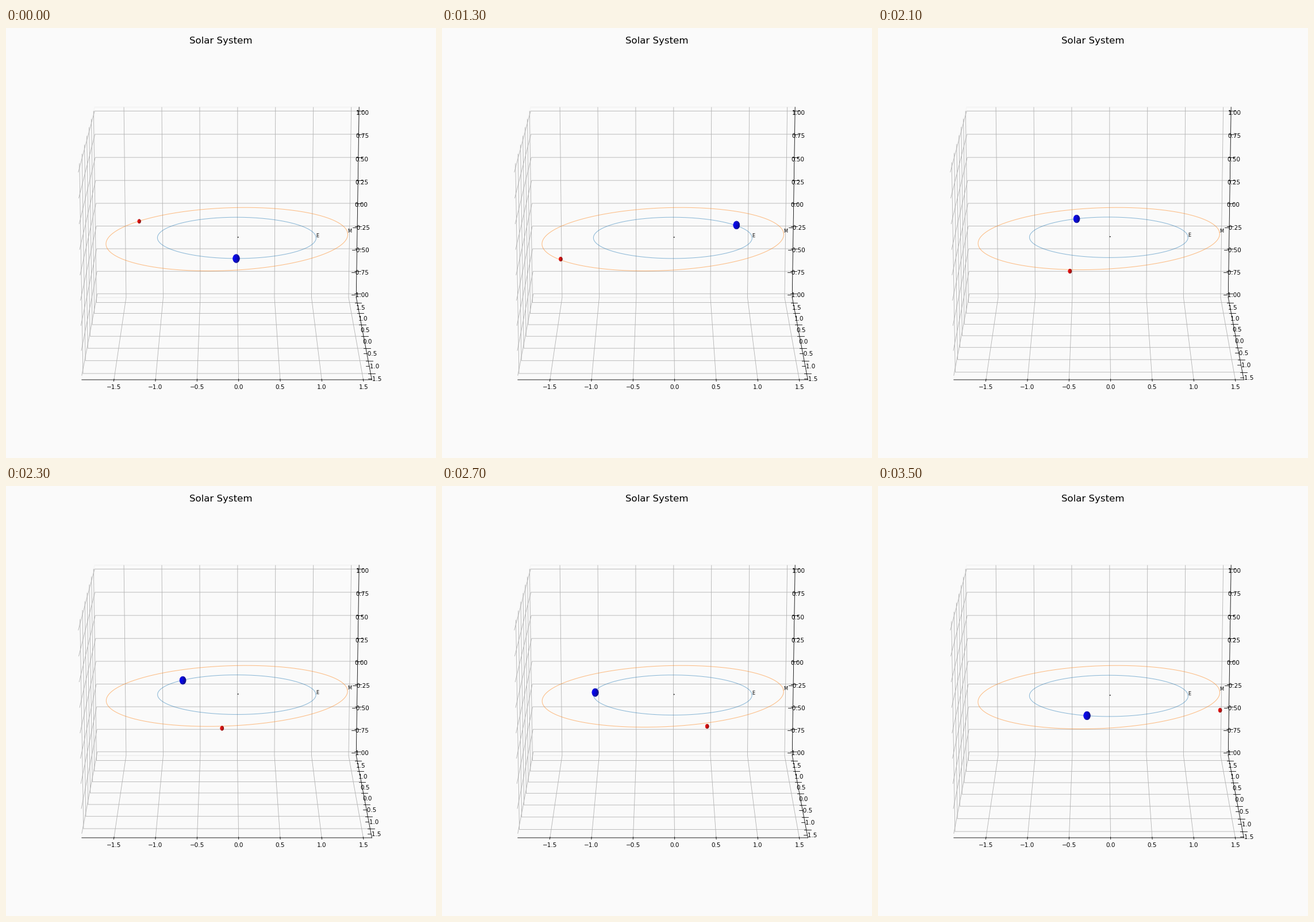
Write a matplotlib script that moves like this. It is 748x748 px and loops after 3.6 s.

```python
import numpy as np
import matplotlib.pyplot as plt
from matplotlib.animation import FuncAnimation

FRAMES, INTERVAL = 36, 100
DAYS_PER_FRAME = 10
KM = 1000 / 149.6e6          # planet radii are enlarged 1000 times
BACK = "#fafafa"


class Planet:
    def __init__(self, label, color, a, e, incl, period, start, radius):
        self.label, self.color = label, color
        self.a, self.e, self.incl = a, e, np.radians(incl)
        self.start = np.radians(start)
        self.step = 2 * np.pi * DAYS_PER_FRAME / period
        self.size = radius * KM
        self.dist = self.radius_at(self.start)

    def radius_at(self, angle):
        return self.a * (1 - self.e ** 2) / (1 + self.e * np.cos(angle))

    def place(self, r, angle):
        x, y = r * np.cos(angle), r * np.sin(angle)
        return x * np.cos(self.incl), y, x * np.sin(self.incl)

    def orbit(self, n=361):
        angle = np.linspace(0, 2 * np.pi, n)
        return self.place(self.radius_at(angle), angle)

    def position(self, i):
        return self.place(self.dist, self.start + (i + 1) * self.step)


earth = Planet("E", "b", 1.0, 0.0167, 0, 365.256, 258.58, 6371)
mars = Planet("M", "r", 1.5237, 0.0934, 1.85, 686.98, 137.16, 3390)
planets = [earth, mars]

u = np.linspace(0, 2 * np.pi, 25)
v = np.linspace(0.03, np.pi - 0.03, 15)
BALL = (np.outer(np.cos(u), np.sin(v)),
        np.outer(np.sin(u), np.sin(v)),
        np.outer(np.ones_like(u), np.cos(v)))


def draw_ball(center, radius, color):
    x, y, z = (c + radius * b for c, b in zip(center, BALL))
    return ax.plot_surface(x, y, z, color=color, rstride=1, cstride=1)


def padded(lo, hi):
    """Data range plus a 5 % margin and a 1/48 view margin."""
    for m in (0.05, 1 / 48):
        pad = m * (hi - lo)
        lo, hi = lo - pad, hi + pad
    return lo, hi


fig = plt.figure(figsize=(10, 10), dpi=74.8, facecolor=BACK)
fig.suptitle("Solar System", fontsize=16)
ax = fig.add_axes([0, 0, 1, 1], projection="3d", facecolor=BACK)
ax.view_init(elev=15, azim=-89.999)
ax.tick_params(axis="both", pad=-2.4)
for axis in (ax.xaxis, ax.yaxis, ax.zaxis):
    axis.pane.fill = False

for p in planets:
    path = p.orbit()
    ax.plot(*path, lw=1, alpha=0.5)
    ax.text(*(c[0] for c in path), p.label, fontsize=8)
draw_ball((0, 0, 0), 0.00465, "k")

orbit_x, orbit_y, _ = mars.orbit()
balls = []


def update(i):
    while balls:
        balls.pop().remove()
    for p in planets:
        balls.append(draw_ball(p.position(i), p.size, p.color))
    # the depth range grows when the outer planet leaves its drawn orbit
    low = min(orbit_y.min(), mars.position(i)[1] - mars.size)
    ax.set_xlim(*padded(orbit_x.min(), orbit_x.max()))
    ax.set_ylim(*padded(low, orbit_y.max()))
    ax.set_zlim(-25 / 24, 25 / 24)
    return balls


anim = FuncAnimation(fig, update, frames=FRAMES, interval=INTERVAL,
                     init_func=lambda: [], repeat=True, repeat_delay=0)
plt.show()
```
